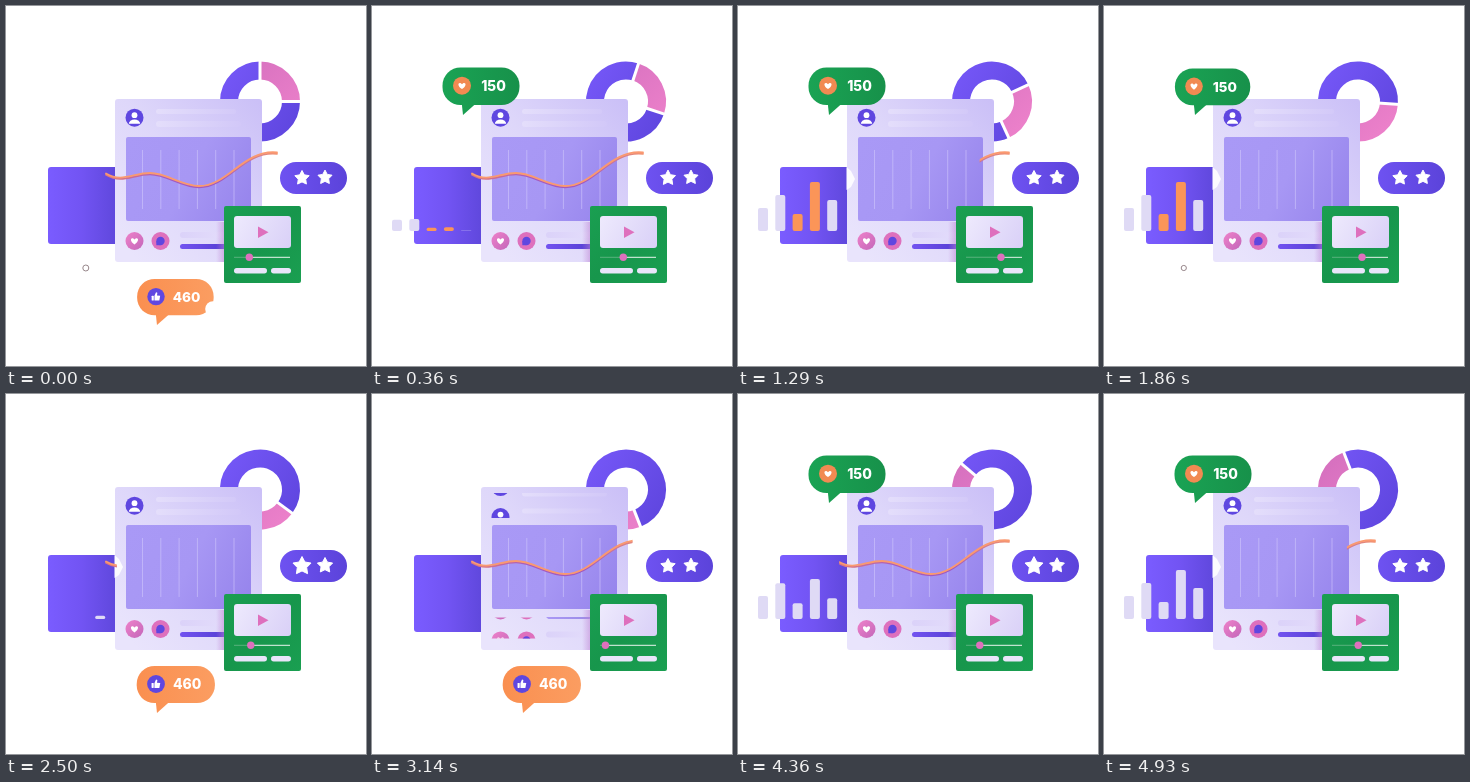
An HTML page with a canvas for the animation above (5000 ms loop, 360 by 360 pixels).

```html
<!DOCTYPE html>
<html lang="en">
<head>
<meta charset="utf-8">
<title>Social dashboard</title>
<style>
html, body { margin: 0; width: 100%; height: 100%; overflow: hidden; background: #fff; }
canvas { display: block; width: 360px; height: 360px; }
</style>
</head>
<body>
<canvas id="stage"></canvas>
<script>
const LOOP = 5000;
const TAU = Math.PI * 2;
const canvas = document.getElementById('stage');
const ctx = canvas.getContext('2d');
const dpr = window.devicePixelRatio || 1;
canvas.width = canvas.height = 360 * dpr;

const VIOLET = '#5f47e0', PINK = '#de70bd', ORANGE = '#fb9558', PALE = '#dfdaf5';

// Timing helpers: progress from 0 to 1, eased progress, and soft pulses.
const ramp = (t, start, span) => Math.min(1, Math.max(0, (t - start) / span));
const smooth = u => u * u * (3 - 2 * u);
const easeOut = u => u * (2 - u);
const bump = (t, center, width) => Math.exp(-(((t - center) / width) ** 2));
const pulse = (t, center, period) => Math.cos(Math.PI * (t - center) / period) ** 20;

function blend(x0, y0, x1, y1, ...colors) {
  const g = ctx.createLinearGradient(x0, y0, x1, y1);
  colors.forEach((c, i) => g.addColorStop(i / (colors.length - 1), c));
  return g;
}

function box(x, y, w, h, r, fill) {
  if (w <= 0 || h <= 0) return;
  ctx.beginPath();
  ctx.roundRect(x, y, w, h, Math.min(r, w / 2, h / 2));
  ctx.fillStyle = fill;
  ctx.fill();
}

function disc(x, y, r, fill) {
  ctx.beginPath();
  ctx.arc(x, y, r, 0, TAU);
  ctx.fillStyle = fill;
  ctx.fill();
}

function polygon(points, fill) {
  ctx.beginPath();
  points.forEach(([x, y]) => ctx.lineTo(x, y));
  ctx.closePath();
  ctx.fillStyle = fill;
  ctx.fill();
}

function clipped(x, y, w, h, draw) {
  ctx.save();
  ctx.beginPath();
  ctx.rect(x, y, w, h);
  ctx.clip();
  draw();
  ctx.restore();
}

function heart(x, y) {
  ctx.beginPath();
  ctx.moveTo(x, y + 3.4);
  ctx.bezierCurveTo(x - 6.4, y - 1, x - 2.7, y - 5, x, y - 1.4);
  ctx.bezierCurveTo(x + 2.7, y - 5, x + 6.4, y - 1, x, y + 3.4);
  ctx.fillStyle = '#fff';
  ctx.fill();
}

function thumb(x, y) {
  box(x - 4.5, y - 1, 2.2, 5, 0.6, '#fff');
  polygon([[x - 1.6, y - 0.8], [x, y - 4.5], [x + 1.4, y - 4], [x + 1, y - 1.2],
    [x + 4.3, y - 1], [x + 3.4, y + 4], [x - 1.6, y + 4]], '#fff');
}

function star(x, y, r) {
  const points = Array.from({ length: 10 }, (_, i) => {
    const a = i * TAU / 10 - TAU / 4, d = i % 2 ? r * 0.52 : r;
    return [x + d * Math.cos(a), y + d * Math.sin(a)];
  });
  polygon(points, '#fff');
  ctx.strokeStyle = '#fff';
  ctx.lineWidth = 1;
  ctx.lineJoin = 'round';
  ctx.stroke();
}

function donut(t) {
  const start = (0.0505 * t - 90) * TAU / 360;
  const end = start + TAU / 4;
  const arc = (a, b, color) => {
    ctx.beginPath();
    ctx.arc(254, 95.5, 31, a, b);
    ctx.strokeStyle = color;
    ctx.lineWidth = 18;
    ctx.stroke();
  };
  ctx.lineCap = 'butt';
  arc(end, start + TAU, blend(216, 70, 294, 115, '#7557f7', '#5f46df'));
  arc(start, end, blend(220, 60, 290, 130, '#d46fbe', '#ee82cb'));
  ctx.strokeStyle = '#fff';
  ctx.lineWidth = 3;
  for (const a of [start, end]) {
    ctx.beginPath();
    ctx.moveTo(254 + 20 * Math.cos(a), 95.5 + 20 * Math.sin(a));
    ctx.lineTo(254 + 42 * Math.cos(a), 95.5 + 42 * Math.sin(a));
    ctx.stroke();
  }
}

function barChart(t) {
  box(42, 161, 70, 77, 3, blend(42, 0, 109, 0, '#7a5cff', '#7254f3', '#6048dd'));
  const second = t > 3000;
  [23, 36, 17, 49, 31].forEach((full, i) => {
    const lag = i * 70;
    const rise = smooth(ramp(t, (second ? 3680 : 40) + lag, 650));
    const fall = second ? 0 : smooth(ramp(t, 1900 + lag, 400));
    const h = full * (rise - fall);
    const accent = !second && (i === 2 || i === 3);
    box(20 + i * 17.3, 225 - h, 10, h, 2, accent ? ORANGE : PALE);
  });
}

function cardHead(dy) {
  const y = 111.7 + dy;
  disc(128.5, y, 9, VIOLET);
  disc(128.5, y - 2.5, 2.9, '#fff');
  ctx.beginPath();
  ctx.ellipse(128.5, y + 6, 5.7, 4.3, 0, Math.PI, TAU);
  ctx.fillStyle = '#fff';
  ctx.fill();
  const line = blend(150, 0, 235, 0, '#e4defb', '#d2c8f8');
  box(150, 103 + dy, 80, 5, 2.5, line);
  box(150, 115 + dy, 85, 6, 3, line);
}

function cardFoot(dy) {
  const y = 235 + dy;
  disc(128.5, y, 9, blend(119, y - 9, 137, y + 9, '#ef82ca', '#c467ba'));
  heart(128.5, y);
  disc(154.5, y, 9, PINK);
  disc(154.5, y, 4.2, VIOLET);
  box(150.3, y, 4.2, 4.2, 0.5, VIOLET);
  box(174, y - 9, 46, 6, 3, blend(174, 0, 218, 0, '#dbd2f9', '#e3dcfb'));
  box(174, y + 3, 46, 5, 2.5, blend(174, 0, 218, 0, '#7253f0', '#5740d4'));
}

function postCard(t) {
  box(109, 93, 147, 163, 3, blend(109, 230, 256, 100, '#e9e4fc', '#ded7fa', '#cbc0f7'));
  const roll = ramp(t, t < 2000 ? 410 : 2800, 550) % 1;
  const rows = roll ? [-30 * roll, 30 * (1 - roll)] : [0];
  clipped(109, 99, 147, 25, () => rows.forEach(cardHead));
  clipped(109, 223.5, 147, 21, () => rows.forEach(cardFoot));
  box(210, 216, 9, 40, 0, blend(210, 0, 218, 0, 'rgba(190,130,210,0)', 'rgba(190,130,210,.5)'));

  box(120, 131, 125, 84, 2, blend(120, 140, 245, 205, '#a999f6', '#a797f4', '#9684ec'));
  for (let i = 0; i < 6; i++) {
    box(136 + i * 18.3, 144, 1, 59, 0, 'rgba(205,195,250,.65)');
  }
}

function traceWave(dy, color) {
  ctx.beginPath();
  ctx.moveTo(100, 167.5 + dy);
  ctx.bezierCurveTo(116, 177 + dy, 127, 167 + dy, 144, 167 + dy);
  ctx.bezierCurveTo(161, 167 + dy, 175, 180 + dy, 193, 180 + dy);
  ctx.bezierCurveTo(222, 180 + dy, 238, 143 + dy, 271, 146.5 + dy);
  ctx.strokeStyle = color;
  ctx.lineWidth = 1.8;
  ctx.lineCap = 'round';
  ctx.stroke();
}

function wave(t) {
  const second = t > 2000;
  const from = ramp(t, second ? 4350 : 715, 700);
  const to = second ? ramp(t, 2448, 744) : 1;
  if (from > 0.06 || to < 0.1) {
    polygon([[108.5, 161], [113, 165], [117, 173], [113, 181], [108.5, 184]], '#fcfbff');
  }
  if (to <= from) return;
  clipped(98.5 + 174 * from, 130, 174 * (to - from), 70, () => {
    traceWave(1.3, blend(100, 0, 271, 0, '#e47b75', '#a55ac0', '#a05abe', '#f29270'));
    traceWave(0, '#fa9970');
  });
}

function rating(t) {
  box(274, 156, 67, 32, 16, blend(274, 0, 341, 0, '#6e52f1', '#5b43da'));
  star(296, 172, 7.5 + 2 * pulse(t, 600, 1900));
  star(319, 171.5, 7.4 + 1.8 * pulse(t, 800, 1900));
}

function playIcon(x, alpha) {
  ctx.globalAlpha = alpha;
  polygon([[x, 220.5], [x + 10.5, 226.2], [x, 232]], PINK);
  ctx.globalAlpha = 1;
}

function videoCard(t) {
  box(218, 200, 77, 77, 2, blend(218, 200, 295, 277, '#1a9f51', '#17964c', '#1a9f51'));
  box(228, 210, 57, 32, 3, blend(228, 210, 285, 242, '#eeeafd', '#d9d0f7'));
  const slide = ramp(t, 3650, 550) % 1;
  playIcon(252 + slide * 11, 1 - slide);
  if (slide) playIcon(242 + 10 * slide ** 3, Math.min(1, slide * 2.5));

  const knob = 247.2 + 15.8 * Math.cos(TAU * (t - 1285) / 4430);
  box(228, 250.8, knob - 228, 1, 0, '#58b27d');
  box(knob, 250.8, 284 - knob, 1.2, 0, '#c0e2ce');
  disc(knob, 251.3, 3.7, PINK);
  box(228, 262, 33, 5.5, 2.7, '#e9e5fa');
  box(265, 262, 20, 5.5, 2.7, '#e9e5fa');
}

// Speech bubble scaled about the tip of its tail.
function bubble(scale, tipX, tipY, width, fill, iconFill, icon, label) {
  if (scale <= 0.01) return;
  ctx.save();
  ctx.translate(tipX, tipY);
  ctx.scale(scale, scale);
  box(-20, -47.5, width, 37.5, 18, fill);
  polygon([[-1, -14], [0.5, 0], [14, -12]], fill);
  disc(-0.5, -29.3, 9, iconFill);
  icon(-0.5, -29.3);
  ctx.font = '800 14px Inter, sans-serif';
  ctx.textAlign = 'center';
  ctx.fillStyle = '#fff';
  ctx.fillText(label, 31, -24);
  ctx.restore();
}

function bubbles(t) {
  const green = easeOut(ramp(t, 70, 250)) - smooth(ramp(t, 1830, 350)) + easeOut(ramp(t, 3700, 250));
  bubble(green, 90.5, 109, 77, blend(-20, 0, 57, 0, '#1aa354', '#17914a'), '#f18a52', heart, '150');

  // The orange bubble is nibbled at its lower right as it leaves.
  const second = t > 2000;
  const arrive = second ? easeOut(ramp(t, 2100, 330)) : 1;
  const leave = ramp(t, second ? 3780 : -130, 470);
  bubble(0.99 * (arrive - leave ** 3), 150.5, 319, 79,
    blend(-20, 0, 59, 0, '#fa8f50', '#fb9d61'), VIOLET, thumb, '460');
  if (leave > 0 && leave < 1) disc(207, 303, 28 * leave, '#fff');
}

function sparkles(t) {
  const ring = 3 * bump(t, 0, 180) + 2.6 * bump(t, 1860, 180);
  if (ring > 0.3) {
    ctx.beginPath();
    ctx.arc(79.8, 262, ring, 0, TAU);
    ctx.strokeStyle = '#98878b';
    ctx.lineWidth = 1;
    ctx.stroke();
  }
  const plus = 3 * bump(t, 760, 190);
  if (plus > 0.3) {
    box(235 - plus, 298.7, plus * 2, 1.1, 0, '#b86cc8');
    box(234.4, 299.3 - plus, 1.1, plus * 2, 0, '#9c63cf');
  }
}

function draw(t) {
  ctx.setTransform(dpr, 0, 0, dpr, 0, 0);
  ctx.fillStyle = '#fff';
  ctx.fillRect(0, 0, 360, 360);
  for (const part of [donut, barChart, postCard, wave, rating, videoCard, bubbles, sparkles]) part(t);
}

const begin = performance.now();
function tick() {
  draw((performance.now() - begin) % LOOP);
  requestAnimationFrame(tick);
}
tick();
</script>
</body>
</html>
```
